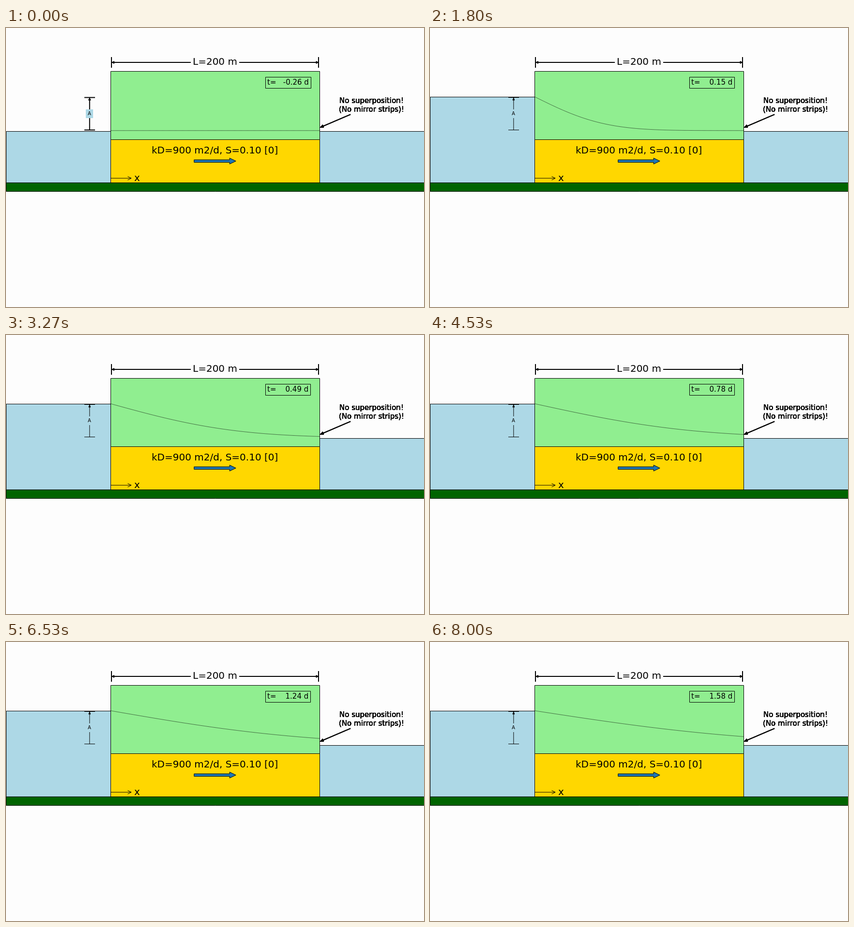
Recreate the animation shown at these times as an HTML page with a canvas. Size 864 by 576 pixels, loop 8070 ms.

```html
<!DOCTYPE html>
<html lang="en">
<head>
<meta charset="utf-8">
<title>Groundwater head after a sudden rise</title>
<style>
html, body { margin: 0; width: 100%; height: 100%; overflow: hidden; background: #fdfdfd; }
canvas { display: block; }
</style>
</head>
<body>
<canvas id="stage" width="864" height="576"></canvas>
<script>
const ctx = document.getElementById('stage').getContext('2d');
const LOOP = 8070;
const STEPS = 120;
const PAPER = '#fdfdfd', WATER = '#add8e6', GRASS = '#90ee90', SAND = '#ffd700', CLAY = '#006400';
const DIFFUSIVITY = 900 / 0.1;
const HALF_TIME = 0.237 * 100 * 100 / DIFFUSIVITY;
const REST = 1.05, TOP = 5;

// World units (metres) to pixels
const px = m => 216 + m * 2.16;
const py = m => 230.4 - m * 576 / 32.5;
const snap = v => Math.floor(v + 0.5) + 0.5;

function erfc(u) {
  const k = 1 / (1 + 0.3275911 * u);
  const poly = ((((1.061405429 * k - 1.453152027) * k + 1.421413741) * k - 0.284496736) * k + 0.254829592) * k;
  return poly * Math.exp(-u * u);
}

function path(points, { fill, stroke = '#000', width = 1, closed = false } = {}) {
  ctx.beginPath();
  points.forEach(([x, y], i) => i ? ctx.lineTo(x, y) : ctx.moveTo(x, y));
  if (closed) ctx.closePath();
  if (fill) { ctx.fillStyle = fill; ctx.fill(); }
  if (stroke) { ctx.strokeStyle = stroke; ctx.lineWidth = width; ctx.stroke(); }
}

const line = (x1, y1, x2, y2, width = 1) => path([[x1, y1], [x2, y2]], { width });

function box(x1, y1, x2, y2, fill, stroke = '#000') {
  path([[x1, y1], [x2, y1], [x2, y2], [x1, y2]], { fill, stroke, closed: true });
}

const block = (x1, top, x2, bottom, fill) =>
  box(snap(px(x1)), snap(py(top)), snap(px(x2)), snap(py(bottom)), fill);

function text(str, x, y, size) {
  ctx.font = `${size}px "DejaVu Sans", sans-serif`;
  ctx.fillStyle = '#000';
  ctx.fillText(str, x, y);
}

function head(x, y, angle, length, half) {
  ctx.save();
  ctx.translate(x, y);
  ctx.rotate(angle);
  path([[0, 0], [-length, -half], [-length, half]], { fill: '#000', closed: true });
  ctx.restore();
}

function lengthArrow() {
  for (const x of [218, 646]) line(x, 60, x, 82, 2);
  line(220, 71, 382, 71, 1.8);
  line(482, 71, 645, 71, 1.8);
  head(218.5, 71, Math.PI, 5, 2.4);
  head(646, 71, 0, 5, 2.4);
  text('L=200 m', 386, 76, 20);
}

function amplitudeArrow(raised) {
  const w = raised ? 1 : 2;
  line(162, 143.5, 184, 143.5, w);
  line(162, 210.5, 184, 210.5, w);
  line(172.8, 146, 172.8, 210.5, w);
  head(172.8, 144, -Math.PI / 2, 5, raised ? 1.9 : 2.4);
  box(165, 168, 180, 186, WATER, null);
  text('A', 169, 180, 10);
}

function flowArrow() {
  const mid = py(-2.5), neck = px(114);
  path([[px(80), mid - 2.66], [neck, mid - 2.66], [neck, mid - 6.2], [px(120), mid],
    [neck, mid + 6.2], [neck, mid + 2.66], [px(80), mid + 2.66]],
    { fill: '#1f77b4', closed: true });
}

function axisArrow() {
  const y = py(-4.5);
  line(217, y, 259, y);
  path([[251.5, y - 3.7], [259, y], [251.5, y + 3.7]]);
  text('x', 265, 316, 20);
}

// Painted over itself so that its soft edges turn solid
function note() {
  for (let pass = 0; pass < 8; pass++) {
    text('No superposition!', 689, 155, 15);
    text('(No mirror strips)!', 688, 173, 15);
    line(712, 178.5, 653, 203.8, 1.5);
    head(650, 205, Math.atan2(26.5, -62), 6, 2.4);
  }
}

function headCurve(days) {
  const points = [];
  for (let x = 0; x <= 200; x++) {
    const share = days > 0 ? erfc(x / Math.sqrt(4 * DIFFUSIVITY * days)) : 0;
    points.push([px(x), py(REST + (TOP - REST) * share)]);
  }
  path(points, { width: 0.55 });
}

function clock(days) {
  box(536.5, 101.5, days < 0 ? 630.5 : 629.5, 124.5, null);
  text('t=' + days.toFixed(2).padStart(8) + ' d', 540, 117, 15);
}

function draw(step) {
  const days = HALF_TIME * (7 * step / STEPS - 1);
  const raised = days > 0;
  ctx.fillStyle = PAPER;
  ctx.fillRect(0, 0, 864, 576);

  block(-100, raised ? TOP : 1, 0, -5, WATER);
  block(200, 1, 300, -5, WATER);
  block(0, 0, 200, -5, SAND);
  block(0, 8, 200, 0, GRASS);
  block(-100, -5, 300, -6, CLAY);

  headCurve(days);
  lengthArrow();
  amplitudeArrow(raised);
  flowArrow();
  axisArrow();
  text('kD=900 m2/d, S=0.10 [0]', 301, 259, 20);
  note();
  clock(days);
}

// 15 steps per second, with each start rounded to 10 ms
function tick(now) {
  const hundredths = Math.floor((now % LOOP) / 10);
  draw(Math.floor((hundredths + 0.5) * 3 / 20));
  requestAnimationFrame(tick);
}

draw(0);
requestAnimationFrame(tick);
</script>
</body>
</html>
```
